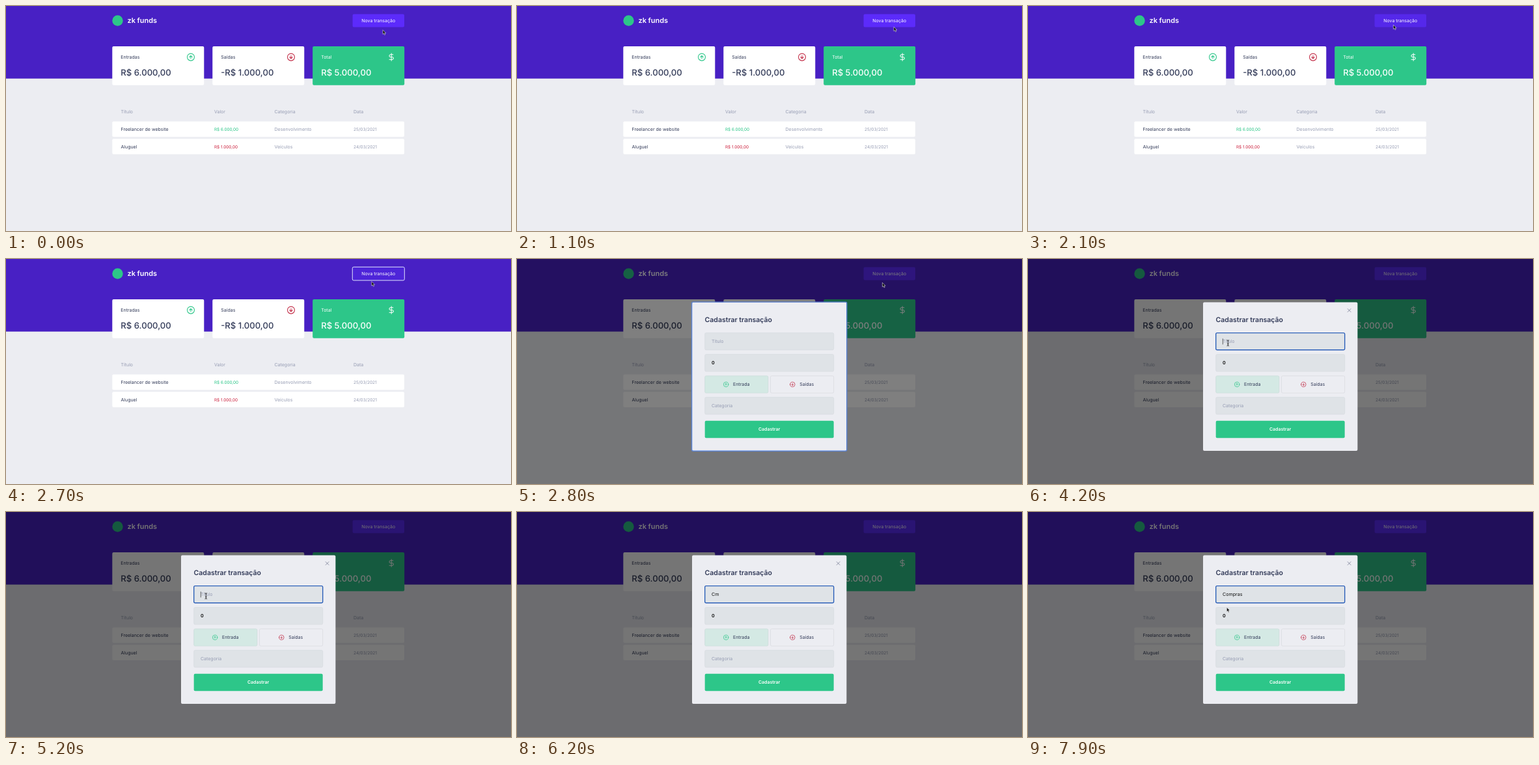
Write an HTML page that moves like this. It is 776 by 346 pixels and loops after 8 s.

```html
<!DOCTYPE html>
<html lang="pt-BR">
<head>
<meta charset="utf-8">
<style>
  html, body { margin: 0; width: 100%; height: 100%; overflow: hidden; background: #ecedf2; }
  svg { display: block; width: 776px; height: 346px; }
  text { font: 7px Inter, "Open Sans", sans-serif; fill: #323a58; text-rendering: geometricPrecision; white-space: pre; }
  .big { font-size: 13.1px; font-weight: 500; }
  .brand { font-size: 10.9px; font-weight: 600; }
  .title { font-size: 10.5px; font-weight: 600; }
  .bold { font-weight: 600; }
  .num { font-size: 6.4px; }
  .date { font-size: 6.6px; }
  .typed { font-size: 7.15px; fill: #111; }
  .white { fill: #fff; }
  .muted { fill: #969cb3; }
  .in { fill: #2dc689; }
  .out { fill: #cc2440; }
  .mid { text-anchor: middle; }
  .line { fill: none; stroke-linecap: round; stroke-linejoin: round; }
</style>
</head>
<body>
<svg id="stage" viewBox="0 0 776 346"></svg>
<script>
const GREEN = '#2dc689', RED = '#c32f49', BLUE = '#2f62ba';

const rect = (x, y, w, h, fill, extra = '') =>
  `<rect x="${x}" y="${y}" width="${w}" height="${h}" rx="2" fill="${fill}" ${extra}/>`;
const text = (x, y, s, cls = '', id = '') => `<text x="${x}" y="${y}" class="${cls}" id="${id}">${s}</text>`;
const arrow = (x, y, r, color, turn) =>
  `<g class="line" transform="translate(${x} ${y}) rotate(${turn}) scale(${r / 10})" stroke="${color}" stroke-width="2">
    <circle r="10"/><path d="M-4 0L0 -4L4 0M0 4V-4"/></g>`;
const card = (x, label, value, fill, cls, icon) =>
  rect(x, 62, 141, 59.7, fill) + text(x + 13, 81.2, label, cls) + text(x + 13, 106.6, value, 'big ' + cls) + icon;
const row = (y, title, value, kind, category, date) =>
  rect(163.3, y, 448.7, 23.8, '#fff') + text(176.5, y + 14.2, title) +
  text(320, y + 14.2, value, 'num ' + kind) + text(412.5, y + 14.2, category, 'muted') +
  text(534, y + 14.2, date, 'date muted');
const field = y => rect(288.7, y, 198, 26.4, '#dfe3e7', 'stroke="#d1d5da" stroke-width=".5"');

const dollar = `<path class="line" transform="translate(592.2 78.5) scale(.53)" stroke="#fff" stroke-width="1.9"
  d="M0 -11V11M5 -7H-2.5a3.5 3.5 0 0 0 0 7h5a3.5 3.5 0 0 1 0 7H-6"/>`;

const page = `
  <rect width="776" height="346" fill="#ecedf2"/>
  <rect width="776" height="111.6" fill="#4820c4"/>
  <circle cx="171.5" cy="22.5" r="8.2" fill="${GREEN}"/>
  ${text(186.5, 26.4, 'zk funds', 'brand white')}
  ${rect(532.6, 12.6, 79.4, 20, '#5c2bfb', 'id="open"')}
  ${text(572.2, 25.2, 'Nova transação', 'white mid')}
  ${rect(532.3, 12.3, 80, 20.6, 'none', 'id="openRing" stroke="#dfe3ff" stroke-width="1"')}
  ${card(163.3, 'Entradas', 'R$ 6.000,00', '#fff', '', arrow(284, 78.6, 5.5, GREEN, 0))}
  ${card(317.3, 'Saídas', '-R$ 1.000,00', '#fff', '', arrow(438, 78.6, 5.5, RED, 180))}
  ${card(471.2, 'Total', 'R$ 5.000,00', GREEN, 'white', dollar)}
  ${text(176.5, 164.8, 'Título', 'muted')}${text(320, 164.8, 'Valor', 'muted')}
  ${text(412.5, 164.8, 'Categoria', 'muted')}${text(534, 164.8, 'Data', 'muted')}
  ${row(177.5, 'Freelancer de website', 'R$ 6.000,00', 'in', 'Desenvolvimento', '25/03/2021')}
  ${row(204.3, 'Aluguel', 'R$ 1.000,00', 'out', 'Veículos', '24/03/2021')}`;

const modal = `<g id="modal">
  <rect id="shade" width="776" height="346"/>
  ${rect(269, 66.5, 237.4, 228.4, '#ecedf2')}
  ${rect(268.6, 66.1, 238.2, 229.2, 'none', 'id="modalRing" stroke="#5a83d6" stroke-width="1.4"')}
  <path id="close" class="line" d="M491.2 76.6l4.8 4.8m0 -4.8l-4.8 4.8" stroke="#858aa0" stroke-width=".9"/>
  ${text(288.6, 97, 'Cadastrar transação', 'title')}
  ${field(113.5)}${field(146.6)}${field(212.5)}
  ${rect(288.7, 113.6, 198, 26.2, 'none', `id="fieldRing" stroke="${BLUE}" stroke-width="1.4"`)}
  ${text(299, 129.2, 'Título', 'muted', 'hint')}${text(299, 129.2, '', 'typed', 'typed')}
  <rect id="caret" y="122.4" width=".6" height="9" fill="#111"/>
  ${text(299, 162.1, '0', 'bold typed')}
  ${rect(288.7, 179.7, 97.2, 26.4, '#d4e9e4', 'stroke="#c8d8d6" stroke-width=".6"')}
  ${rect(389.5, 179.7, 97.2, 26.4, 'none', 'stroke="#d3d6db" stroke-width=".6"')}
  ${arrow(321.1, 192.9, 3.7, GREEN, 0)}${text(332, 195.2, 'Entrada')}
  ${arrow(423.4, 192.9, 3.7, RED, 180)}${text(434.2, 195.2, 'Saídas')}
  ${text(299, 228.1, 'Categoria', 'muted')}
  ${rect(288.7, 248.7, 198, 26.5, GREEN)}${text(387.6, 264.3, 'Cadastrar', 'bold white mid')}
  </g>`;

const pointers = `
  <path id="arrow" d="M0 0V6.6L1.5 5.2L2.6 7.7L3.8 7.2L2.7 4.8H4.8Z" fill="#111" stroke="#fff" stroke-width=".5"/>
  <path id="beam" class="line" d="M-1.4 -4.5Q0 -4.5 0 -3.5Q0 -4.5 1.4 -4.5M0 -3.5V3.5M-1.4 4.5Q0 4.5 0 3.5Q0 4.5 1.4 4.5M-1 1.4H1" stroke="#222" stroke-width=".8"/>`;

document.getElementById('stage').innerHTML = page + modal + pointers;
const $ = id => document.getElementById(id);
const show = (id, on) => $(id).setAttribute('visibility', on ? 'inherit' : 'hidden');

// time, x, y of the pointer
const path = [[0, 579, 36.8], [900, 579, 32.3], [1100, 579, 32], [1400, 570, 24.5], [1700, 570, 24.5],
  [1800, 561.3, 28], [2000, 561.3, 28], [2700, 561.8, 34.6], [2900, 561, 38], [3500, 307.3, 129.2],
  [7800, 307.3, 129.2], [7900, 305.4, 146.8]];
// time and content of the first field
const typing = [[4100, ''], [5500, 'C'], [5700, 'Cm'], [6300, 'C'], [6600, 'Co'], [6700, 'Com'],
  [6900, 'Comp'], [7100, 'Compr'], [7200, 'Compra'], [7400, 'Compras']];

function pointerAt(t) {
  const i = path.findIndex(p => p[0] > t);
  if (i < 0) return path[path.length - 1].slice(1);
  const [t0, x0, y0] = path[i - 1], [t1, x1, y1] = path[i], k = (t - t0) / (t1 - t0);
  return [x0 + (x1 - x0) * k, y0 + (y1 - y0) * k];
}

function draw(t) {
  const opened = t >= 2800, focused = t >= 4100;
  const dim = opened ? 0 : Math.min(1, Math.max(0, (t - 2000) / 200));
  $('open').setAttribute('fill', `rgb(${92 - 14 * dim},${43 - 6 * dim},${251 - 34 * dim})`);
  show('openRing', t >= 2700 && !opened);
  show('modal', opened);
  $('shade').setAttribute('opacity', t < 2900 ? .5 : .54);
  show('close', t >= 2900 && opened);
  if (!opened) $('close').setAttribute('visibility', 'hidden');
  $('modalRing').setAttribute('opacity', focused ? 0 : 1);
  $('fieldRing').setAttribute('opacity', focused ? 1 : 0);

  const [since, value] = typing.filter(k => k[0] <= t).pop() || [0, ''];
  $('typed').textContent = value;
  $('hint').setAttribute('opacity', value ? 0 : 1);
  const blinkFrom = value ? since : 4200;
  const caretOn = focused && (t < blinkFrom || Math.floor((t - blinkFrom) / 500) % 2 === 0);
  $('caret').setAttribute('opacity', caretOn ? 1 : 0);
  $('caret').setAttribute('x', 298.9 + (value ? $('typed').getComputedTextLength() + .3 : 0));

  const [x, y] = pointerAt(t);
  const overField = opened && x > 288 && x < 487 && y > 113 && y < 140;
  const hidden = t >= 5500 && t < 7900;
  show('arrow', !overField && !hidden);
  show('beam', overField && !hidden);
  for (const id of ['arrow', 'beam']) $(id).setAttribute('transform', `translate(${x} ${y})`);
}

const start = performance.now();
function tick(now) {
  draw(Math.floor(Math.max(0, now - start) % 8000 / 100) * 100);
  requestAnimationFrame(tick);
}
draw(0);
requestAnimationFrame(tick);
</script>
</body>
</html>
```
